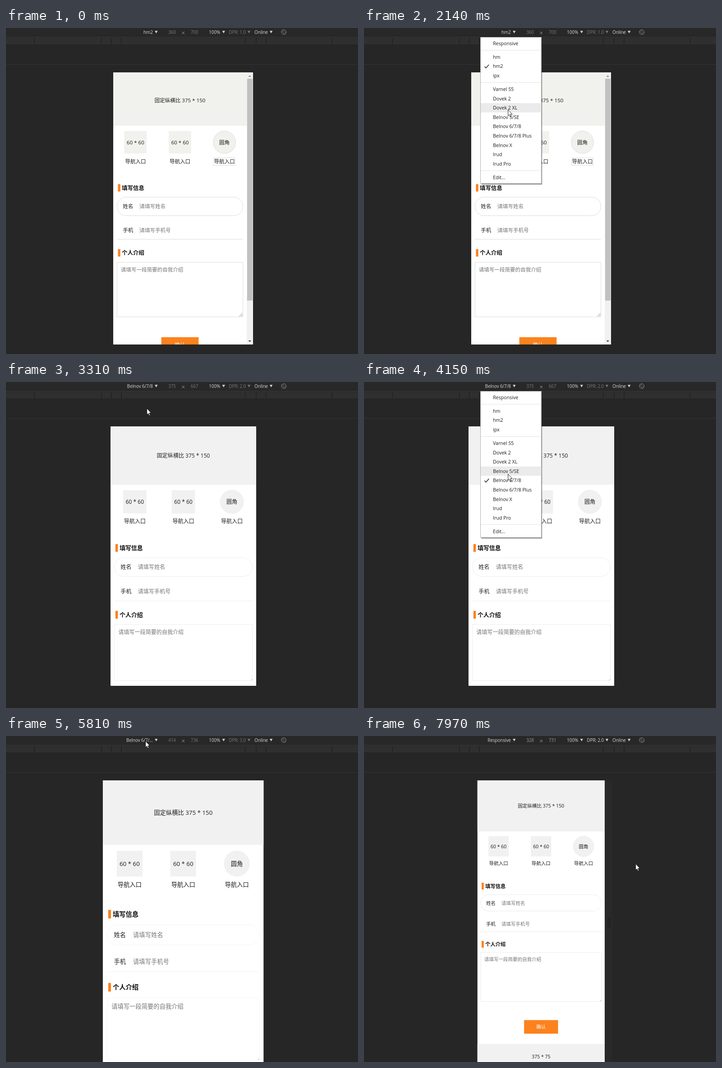
Animation, 778 px wide and 720 px high, one loop 8 s. Source, as an HTML page:

```html
<!DOCTYPE html>
<html lang="zh">
<head>
<meta charset="utf-8">
<title>Responsive preview</title>
<style>
  html, body { margin: 0; width: 100%; height: 100%; overflow: hidden; background: #262626; }
  svg { display: block; }
  text { font-family: "Open Sans", "Noto Sans CJK SC", "Noto Sans CJK", sans-serif; white-space: pre; }
  .bar text { font-size: 10px; letter-spacing: -.15px; }
  .menu text { font-size: 10.6px; fill: #1c1c1c; }
  .line { fill: none; stroke: var(--line); }
</style>
</head>
<body>
<svg id="stage" width="778" height="720" viewBox="0 0 778 720"></svg>
<script>
const LOOP = 8000, TOP = 98;
const ORANGE = '#fc821d', INK = '#1d1d1d', HINT = '#757575';
const stage = document.getElementById('stage');

function add(parent, tag, attrs = {}, content) {
  const el = document.createElementNS('http://www.w3.org/2000/svg', tag);
  for (const key in attrs) el.setAttribute(key, attrs[key]);
  if (content !== undefined) el.textContent = content;
  parent.appendChild(el);
  return el;
}
const rect = (p, x, y, width, height, fill, more) =>
  add(p, 'rect', { x, y, width, height, fill, ...more });
const path = (p, d, more) => add(p, 'path', { d, ...more });
// Text whose glyphs are centred vertically on cy
const label = (p, str, x, cy, size, fill, more) =>
  add(p, 'text', { x, y: cy + size * .37, 'font-size': size, fill, ...more }, str);
const show = (el, on) => { el.style.display = on ? '' : 'none'; };
const MID = { 'text-anchor': 'middle' };
const END = { 'text-anchor': 'end' };

// k scales design pixels; rows are the vertical positions on the stage
const scenes = [
  { from: 0, name: 'hm2', item: 2, size: ['360', '700'], dpr: '1.0',
    x: 237, w: 295, k: .824, bottom: 699, line: '#dcdcdc', tint: '#f1f1ed', outlined: true, scrollbar: true,
    rows: { head: 160, nav: 295, info: 353, pill: 373.5, pillEnd: 414.5, who: 394, phone: 446.5, rule: 466.5, about: 496.5, area: 517.5, areaEnd: 638 } },
  { from: 2770, name: 'Belnov 6/7/8', item: 8, size: ['375', '667'], dpr: '2.0',
    x: 231, w: 322, k: .8587, bottom: 671, line: '#ededed', tint: '#f1f1f1',
    rows: { head: 162.5, nav: 307.5, info: 366.5, pill: 388, pillEnd: 429.5, who: 409, phone: 463, rule: 483.5, about: 514, area: 535.5, areaEnd: 659.5 } },
  { from: 4870, name: 'Belnov 6/7/...', item: 9, size: ['414', '736'], dpr: '3.0',
    x: 214, w: 355.5, k: .948, bottom: 730, line: '#f4f4f4', tint: '#f1f1f1', outlined: true,
    rows: { head: 169, nav: 328.5, info: 393.5, pill: 417, pillEnd: 461.5, who: 439.5, phone: 498, rule: 520.5, about: 555, area: 578.5, areaEnd: 715.5 } },
  { from: 6730, name: 'Responsive', item: 0, size: ['328', '731'], dpr: '2.0',
    x: 250.5, w: 281.7, k: .751, bottom: 726, line: '#ebebeb', tint: '#f1f1f1', free: true,
    rows: { head: 154.5, nav: 281.5, info: 331.5, pill: 350.5, pillEnd: 386.5, who: 369, phone: 415, rule: 432.5, about: 460, area: 478, areaEnd: 586.5 } }
];

function drawFrame() {
  rect(stage, 0, 0, 778, 720, '#262626');
  rect(stage, 0, 0, 778, 20, '#282828');
  rect(stage, 0, 20, 778, 1, '#3c3c3c');
  rect(stage, 0, 22, 778, 14, '#2f2f2f');
  for (const x of [62, 210, 232, 254, 528, 552, 574, 720]) rect(stage, x, 22, 1.5, 14, '#212121');
  rect(stage, 0, 80, 778, 1, '#343434');
}

function drawBar(p, s) {
  const bright = '#d6d6d6', dim = '#777';
  const put = (str, x, fill, more) => label(p, str, x, 9, 10, fill, more);
  const arrow = (x, fill) => path(p, `M${x - 3.2} 6.3h6.4l-3.2 5.4z`, { fill });
  put(s.name, 324.5, bright, END);
  arrow(332, bright);
  put(s.size[0], 367, s.free ? '#999' : dim, MID);
  path(p, 'M389 8.2l5.4 5.4m0 -5.4l-5.4 5.4', { stroke: '#a3a3a3' });
  put(s.size[1], 416.5, s.free ? '#999' : dim, MID);
  put('100%', 448.5, bright);
  arrow(481, bright);
  put('DPR: ' + s.dpr, 492.5, s.free ? bright : dim);
  arrow(537, s.free ? bright : dim);
  put('Online', 549, bright);
  arrow(586, bright);
  add(p, 'circle', { cx: 614, cy: 9, r: 5.3, fill: 'none', stroke: '#8a8a8a' });
  path(p, 'M609 6.8l2.5 -2.2l7.3 7l-2.5 2.3z', { fill: 'none', stroke: '#8a8a8a', 'stroke-width': .9 });
}

function drawPage(parent, s) {
  const { x, w, k, rows: r } = s;
  const h = s.bottom - TOP, mid = x + w / 2, font = 14 * k;
  const p = add(parent, 'svg', { x, y: TOP, width: w, height: h, viewBox: `${x} ${TOP} ${w} ${h}` });
  rect(p, x, TOP, w, h, '#fff');

  rect(p, x, TOP, w, w * .4, s.tint);
  label(p, '固定纵横比 375 * 150', mid, r.head, font, INK, MID);

  const box = 60 * k, navTop = TOP + w * .4 + 14 * k, navMid = navTop + box / 2;
  for (let i = 0; i < 3; i++) {
    const cx = x + w * (2 * i + 1) / 6;
    if (i < 2) rect(p, cx - box / 2, navTop, box, box, s.tint);
    else add(p, 'circle', { cx, cy: navMid, r: box / 2, class: 'line', style: `fill:${s.tint}` });
    label(p, i < 2 ? '60 * 60' : '圆角', cx, navMid, font, INK, MID);
    label(p, '导航入口', cx, r.nav, font, INK, MID);
    if (i === 2 && s.outlined)
      rect(p, cx - 29 * k, r.nav - 10 * k, 58 * k, 20 * k, 'none', { class: 'line' });
  }

  const left = x + 10 * k, wide = w - 20 * k, hintX = x + 70 * k;
  const title = (str, cy) => {
    rect(p, x + 12.6 * k, cy - 10 * k, 6.4 * k, 20 * k, ORANGE);
    label(p, str, x + 23.2 * k, cy, 15 * k, '#0c0c0c', { 'font-weight': 700 });
  };
  const field = (name, hint, cy) => {
    label(p, name, x + 25.8 * k, cy, font, INK);
    if (s.outlined) path(p, `M${hintX} ${cy - 9 * k}v${19 * k}`, { class: 'line' });
    label(p, hint, hintX + .5, cy, font, HINT);
  };

  title('填写信息', r.info);
  const pillH = r.pillEnd - r.pill;
  rect(p, left, r.pill, wide, pillH, 'none', { rx: pillH / 2, class: 'line' });
  field('姓名', '请填写姓名', r.who);
  field('手机', '请填写手机号', r.phone);
  path(p, `M${left} ${r.rule}h${wide}`, { class: 'line' });

  title('个人介绍', r.about);
  rect(p, left, r.area, wide, r.areaEnd - r.area, 'none', { class: 'line' });
  label(p, '请填写一段简要的自我介绍', x + 20.2 * k, r.area + 20 * k, font, HINT);
  const grip = s.scrollbar ? 'm-8 -1l7 -7m-3 7l3 -3' : 'm-2.5 -1l2 -2';
  path(p, `M${left + wide} ${r.areaEnd}${grip}`, { stroke: '#777', 'stroke-width': .9 });

  const btnTop = r.areaEnd + 54.5 * k, btnH = 40 * k;
  rect(p, mid - 50 * k, btnTop, 100 * k, btnH, ORANGE);
  label(p, '确认', mid, btnTop + btnH / 2, font, '#fff', { ...MID, 'font-weight': 500 });
  const footTop = btnTop + 70 * k;
  rect(p, x, footTop, w, 75 * k, s.tint);
  label(p, '375 * 75', mid, footTop + 37 * k, font, INK, MID);
}

function drawExtras(p, s) {
  if (s.scrollbar) {
    rect(p, 532, TOP, 14, 601, '#f1f1f1');
    rect(p, 533, 112, 12, 490, '#c1c1c1');
    path(p, 'M535.5 108l3.3 -3.6l3.3 3.6z', { fill: '#8b8b8b' });
    path(p, 'M535.5 690l3.3 3.6l3.3 -3.6z', { fill: '#444' });
  }
  if (s.free) {
    rect(p, 532.2, TOP, 17, 622, '#292929');
    path(p, 'M539.5 402v21m4 -21v21', { stroke: '#141414' });
  }
}

for (const s of (drawFrame(), scenes)) {
  s.el = add(stage, 'g', { style: `--line:${s.line}` });
  drawBar(add(s.el, 'g', { class: 'bar' }), s);
  drawPage(s.el, s);
  drawExtras(s.el, s);
}

// Device menu: groups of items parted by rules
const groups = [
  ['Responsive'],
  ['hm', 'hm2', 'ipx'],
  ['Varnel S5', 'Dovek 2', 'Dovek 2 XL', 'Belnov 5/SE', 'Belnov 6/7/8', 'Belnov 6/7/8 Plus', 'Belnov X', 'Irud', 'Irud Pro'],
  ['Edit...']
];
const ROW = 20.6, itemY = [];
const menu = add(stage, 'g', { class: 'menu' });
rect(menu, 260, 23, 134, 323, '#000', { opacity: .25 });
rect(menu, 259, 22, 134, 323, '#000', { opacity: .4 });
rect(menu, 257.5, 20.5, 134.5, 323, '#fff', { stroke: '#b0b0b0' });
const glow = rect(menu, 258, 0, 134, ROW, '#ebebeb');
let rowY = 34;
groups.forEach((items, g) => {
  if (g) {
    rect(menu, 258, rowY - 6, 134, 1, '#e2e2e2');
    rowY += 9.3;
  }
  for (const name of items) {
    label(menu, name, 285, rowY, 10.6, INK);
    itemY.push(rowY);
    rowY += ROW;
  }
});
const tick = path(menu, 'M266.5 .5l3 3.3l6.5 -7.3', { fill: 'none', stroke: '#333', 'stroke-width': 1.6 });
const openTimes = [[1530, 2690], [3840, 4790], [6030, 6660]];

const touch = add(stage, 'circle', { r: 8.2, fill: '#555', 'fill-opacity': .4, stroke: '#555', 'stroke-opacity': .35 });
const arrow = path(stage, 'M.4 .4V14.2L3.5 11.3L5.6 16.2L7.7 15.3L5.6 10.5H9.8Z',
  { fill: '#fff', stroke: '#111', 'stroke-width': .9 });

// Mouse moves: start, end, steps, goal x, goal y, ease-out power for y and x
const moves = [
  [350, 1130, 11, 326, 6, 1.5, 1.5],
  [1680, 2370, 10, 317, 214, 1.5, 1.5],
  [3080, 3690, 9, 304, 10, 2.47, 1],
  [3920, 4390, 7, 329, 242, 2.11, 1],
  [5100, 5810, 10, 308, 11, 2, 1],
  [6110, 6260, 3, 308, 39, 1, 1],
  [6960, 7190, 4, 647, 275, 1.3, 1.3],
  [7900, 7970, 2, 600, 282, 1, 1]
];

function mouseAt(t) {
  let x = 822, y = 741;
  for (const [start, end, steps, gx, gy, powY, powX] of moves) {
    if (t < start) break;
    const gap = (end - start) / (steps - 1);
    const p = Math.min(1, (Math.floor((t - start) / gap + .1) + 1) / steps);
    x += (gx - x) * (1 - (1 - p) ** powX);
    y += (gy - y) * (1 - (1 - p) ** powY);
  }
  return { x: Math.round(x), y: Math.round(y) };
}

function render(t) {
  const scene = scenes.findLast(s => t >= s.from);
  for (const s of scenes) show(s.el, s === scene);
  scenes[2].el.style.setProperty('--line', t < 6660 ? '#f4f4f4' : '#ebebeb');

  const { x, y } = mouseAt(t);
  const open = openTimes.some(([a, b]) => t >= a && t < b);
  show(menu, open);
  const over = itemY.find(c => Math.abs(y - c) <= ROW / 2);
  show(glow, over !== undefined);
  if (over !== undefined) glow.setAttribute('y', over - ROW / 2);
  tick.setAttribute('transform', `translate(0 ${itemY[scene.item]})`);

  const onPage = x > scene.x && x < scene.x + scene.w && y > TOP && y < scene.bottom;
  const finger = onPage && !open && !scene.scrollbar;
  show(touch, finger);
  show(arrow, !finger);
  touch.setAttribute('transform', `translate(${x + .5} ${y + .5})`);
  arrow.setAttribute('transform', `translate(${x} ${y})`);
}

const begin = performance.now();
function frame() {
  render((performance.now() - begin) % LOOP);
  requestAnimationFrame(frame);
}
frame();
</script>
</body>
</html>
```
